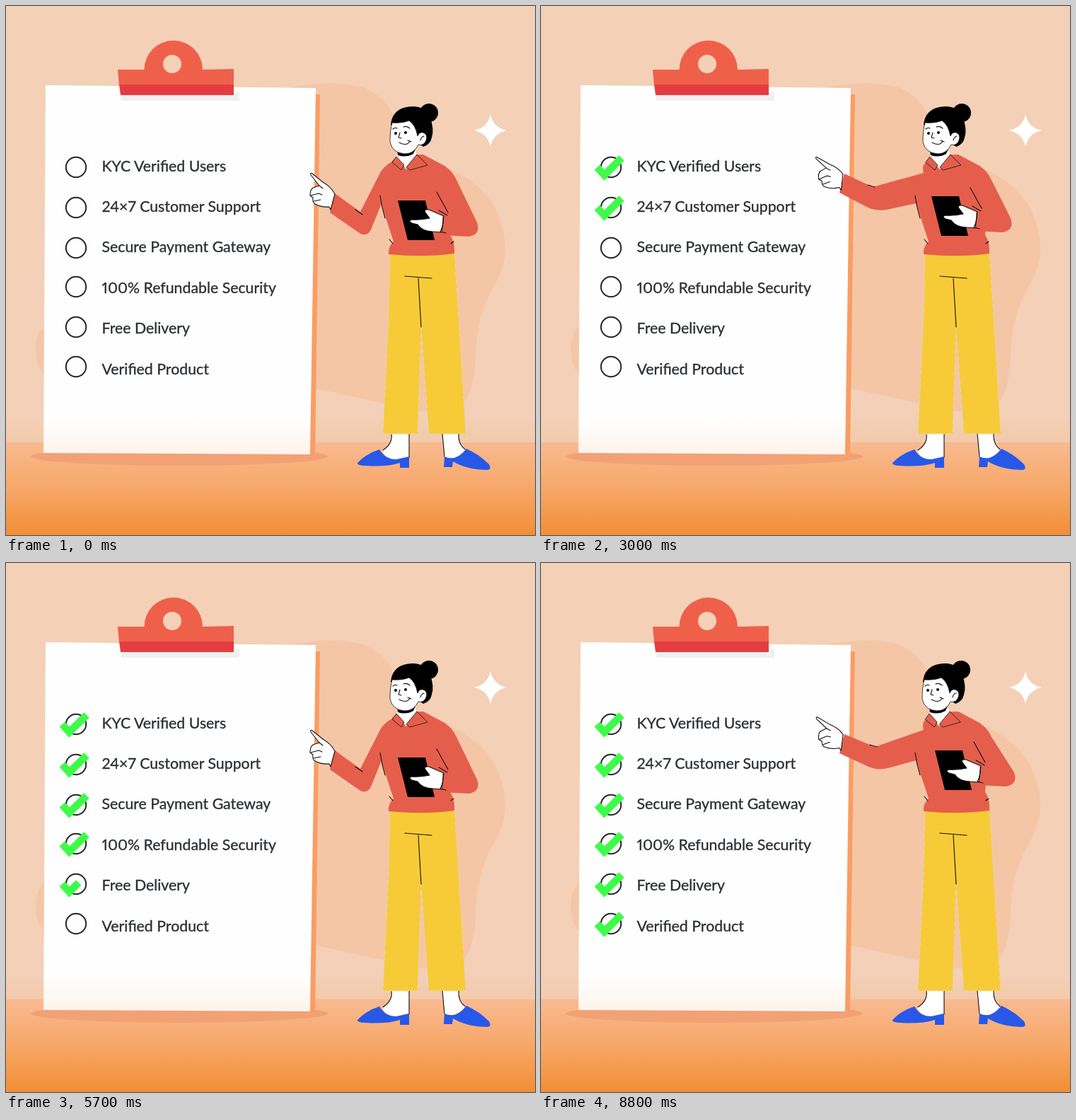
An HTML page that plays this animation: 748x748 px, repeating every 8900 ms.

```html
<!DOCTYPE html>
<html lang="en">
<head>
<meta charset="utf-8">
<title>Checklist</title>
<style>
  html, body { margin: 0; width: 100%; height: 100%; overflow: hidden; background: #f4d0b7; }
  svg { display: block; width: 100vw; height: 100vh; }
  text {
    font: 21.3px Lato, sans-serif; font-variant-numeric: proportional-nums;
    fill: #2b3033; stroke: #2b3033; stroke-width: .35;
  }
  .ring { fill: none; stroke: #25292d; stroke-width: 2; }
  .check { fill: none; stroke: #3ffb49; stroke-width: 10.6; }
  .line { fill: none; stroke: #111; stroke-width: 1.1; stroke-linecap: round; stroke-linejoin: round; }
  .skin { fill: #fff; stroke: #111; stroke-width: 1.1; stroke-linejoin: round; }
  .red { fill: #e55e4c; }
  .blue { fill: #2858e8; }
</style>
</head>
<body>
<svg viewBox="0 0 748 748">
  <defs>
    <linearGradient id="wall" x2="0" y2="1">
      <stop offset="0" stop-color="#f4d0b6"/>
      <stop offset=".94" stop-color="#f3d0b7"/>
      <stop offset="1" stop-color="#f3c9aa"/>
    </linearGradient>
    <linearGradient id="floor" x2="0" y2="1">
      <stop offset="0" stop-color="#f9ba91"/>
      <stop offset=".5" stop-color="#f7a768"/>
      <stop offset="1" stop-color="#f38e35"/>
    </linearGradient>
    <linearGradient id="paper" x2="0" y2="1">
      <stop offset=".9" stop-color="#fffeff"/>
      <stop offset="1" stop-color="#fdf4eb"/>
    </linearGradient>
  </defs>

  <rect width="748" height="618" fill="url(#wall)"/>
  <rect y="617" width="748" height="131" fill="url(#floor)"/>
  <path fill="#f5c6a6" d="M380 120Q455 102 505 115Q548 132 554 180Q575 222 625 230Q702 262 706 340Q707 368 690 396Q664 440 664 500Q661 558 635 571Q600 580 540 563L440 541L60 525Q42 515 42 482Q43 458 60 448Z"/>
  <path fill="#fff" d="M685 153Q689 172 708 176Q689 180 685 199Q681 180 662 176Q681 172 685 153Z"/>

  <ellipse cx="245" cy="637" rx="210" ry="13" fill="#f2a175"/>
  <path fill="#fa9d63" d="M430 125H444L437 635H425Z"/>
  <path fill="url(#paper)" d="M56 112L438 116L430 634L53 632Z"/>
  <path fill="#f1f0f1" d="M162 125L330 122V134H163Z"/>
  <path fill="#ef604a" fill-rule="evenodd" d="M158 90H195.500A41.250 41.250 0 0 1 278 90L322 89V113H160ZM222 82a13 13 0 1 0 26 0a13 13 0 1 0 -26 0Z"/>
  <path fill="#e43d41" d="M160 111H322V126H162Z"/>
  <g id="list"></g>

  <!-- legs -->
  <path fill="#fff" d="M545 603H570V642H540L532 629Q545 620 545 610Z"/>
  <path fill="#fff" d="M617 603H640V613L650 628L636 643L620 638Z"/>
  <path class="line" d="M545 605Q547 619 533 628M570 605V638M617 605L620 637M640 605Q639 619 649 627"/>
  <path class="blue" d="M497 646Q509 633 528 627Q536 641 552 641L570 637V653H557V646Q538 652 508 650Q496 650 497 646Z"/>
  <path class="blue" d="M620 637Q636 645 651 626Q669 634 683 648Q687 655 681 656Q652 656 632 644L631 652H619Z"/>
  <path fill="#f7cb38" stroke="#e6d6ad" stroke-width="1" stroke-dasharray="7 4" d="M543 346H634L640 440L650 605H598L587 455L582 605H533L541 440Z"/>
  <path class="line" d="M564 382L602 385M583 385L587 454"/>

  <!-- torso -->
  <path class="red" d="M546 219L556 211L590 210L622 227L634 250L628 324Q635 333 634 350Q590 356 541 351Q540 341 548 333L529 275L541 240Z"/>
  <path class="red" id="arm"/>
  <path class="line" id="crease"/>
  <path class="line" d="M529 268Q531 284 536 300M542 330L547 336M633 333L629 336"/>
  <g id="hand">
    <path class="skin" d="M465 266Q460 256 448 249L433 237Q430 235 431 239L443 254L434 257Q430 260 430 268L434 271Q433 278 437 280Q446 285 457 284L459 288Z"/>
    <path class="line" d="M443 254L448 258M431 268L442 265L447 267M435 276L445 274"/>
  </g>

  <path class="red" id="sleeve"/>
  <g id="tablet">
    <path d="M554 275H593L606 331H568Z"/>
    <path class="skin" d="M619 297L598 288Q590 287 593 292L599 300Q585 303 574 302Q568 304 574 307L582 309Q588 318 603 319L616 320Z"/>
    <path class="line" d="M609 263L625 292M612 289L624 296M618 298Q619 310 614 319L622 321"/>
  </g>

  <g id="collar">
    <path fill="#fff" d="M554 205H579L580 212L566 231L552 214Z"/>
    <path class="red" stroke="#111" stroke-width=".8" d="M552 213L546 221L559 232L563 225ZM581 210L596 225L571 232L566 228Z"/>
  </g>
  <g id="head">
    <circle cx="598" cy="151" r="13"/>
    <path d="M544 168Q546 147 566 143Q590 138 599 156Q606 174 602 186Q600 196 590 199L570 186Z"/>
    <path d="M553 204L580 200L576 209Q566 215 554 211Z"/>
    <path fill="#fff" stroke="#111" stroke-width=".8" d="M546 165Q560 166 570 162Q579 168 582 184Q584 178 590 179Q597 182 594 190Q591 198 583 196Q577 209 564 209Q546 208 543 192Q543 176 546 165Z"/>
    <circle cx="551" cy="180" r="2"/>
    <circle cx="565" cy="179" r="2"/>
    <path class="line" d="M547 174Q550 171 553 173M562 171Q567 169 571 173M557 179L555 186L559 187M556 193Q567 199 571 191M568 190L573 192M586 190Q587 185 591 184"/>
  </g>
</svg>
<script>
const LOOP = 8900, SWAY = 6000, STEP = 100, DRAW = 500;
const $ = id => document.getElementById(id);

// label, ring centre, text baseline, time its tick starts
const items = [
  ['KYC Verified Users', 228, 234, 600],
  ['24×7 Customer Support', 285, 291, 1800],
  ['Secure Payment Gateway', 342, 348, 3100],
  ['100% Refundable Security', 397, 405.5, 4390],
  ['Free Delivery', 454, 462.5, 5360],
  ['Verified Product', 510, 521, 6400]
];
$('list').innerHTML = items.map(([label, ring, base]) => `
  <circle class="ring" cx="99" cy="${ring}" r="14.2"/>
  <text x="135.500" y="${base}">${label}</text>
  <path class="check" pathLength="1" d="M79.500 ${ring}L89.500 ${ring + 11}L114 ${ring - 13}"/>`).join('');
const checks = document.querySelectorAll('.check');

// time, head shift, tablet shift x y, inner elbow x y, outer elbow x y, cuff top x y, hand turn
const poses = [
  [0, 0, 0, 0, 501, 291, 503, 324, 465, 265, 0],
  [1000, -2.500, 3, -4, 490, 285, 492, 317, 450, 258, -2],
  [1900, -5.500, 7, -11, 474, 265, 476, 296, 431, 246, -7],
  [2800, -4, 3, -10, 472, 260, 474, 291, 429, 242, -8],
  [3000, -3, -2, -6, 469, 256, 472, 288, 429, 237, -9],
  [4600, 0, -11, 4, 478, 262, 476, 292, 440, 230, -9],
  [5700, 0, 0, 0, 501, 291, 503, 324, 465, 265, 0],
  [6000, 0, 0, 0, 501, 291, 503, 324, 465, 265, 0]
];
const mix = (a, b, k) => a + (b - a) * k;
const between = (p, q, k) => p.map((v, i) => mix(v, q[i], k));

function poseAt(t) {
  const next = poses.findIndex(p => p[0] > t);
  const a = poses[next - 1], b = poses[next];
  return between(a, b, (t - a[0]) / (b[0] - a[0]));
}

function drawPerson(t) {
  const [, head, tx, ty, ix, iy, bx, by, cx, cy, turn] = poseAt(t);
  const lift = Math.min(1, (501 - ix) / 27);
  const cuff = [cx - 7, cy + 27], pit = [531, 279];
  const elbow = [bx + mix(8, 2, lift), by + mix(5, 3, lift)];

  $('arm').setAttribute('d', `M548 219Q537 224 ${mix(530, 541, lift)} ${mix(234, 236, lift)}
    L${ix} ${iy}L${cx} ${cy}L${cuff}L${between(elbow, cuff, .25)}
    Q${elbow} ${between(elbow, pit, .3)}L${pit}L560 260Z`);
  $('crease').setAttribute('d', `M${ix - 7} ${iy - 3}L${ix + 3} ${iy + mix(4, 0, lift)}`);
  $('hand').setAttribute('transform',
    `translate(${cx - 465} ${cy - 265}) rotate(${turn} 461 279)`);

  const at = (x, y) => `${x + tx} ${y + ty}`;
  $('sleeve').setAttribute('d', `M600 216L620 227Q630 231 637 246L${at(666, 306)}
    Q${at(672, 323)} ${at(654, 326)}L${at(614, 324)}L${at(619, 296)}L${at(626, 296)}L608 262Z`);
  $('tablet').setAttribute('transform', `translate(${tx} ${ty})`);
  $('head').setAttribute('transform', `translate(${head} 0)`);
  $('collar').setAttribute('transform', `translate(${head * .7} 0)`);
}

function draw(t) {
  checks.forEach((check, i) => {
    const k = Math.max(0, Math.min(1, (t - items[i][3]) / DRAW));
    check.style.visibility = k ? 'visible' : 'hidden';
    check.style.strokeDasharray = `${k} 2`;
  });
  drawPerson(t % SWAY);
}

const start = performance.now();
function tick() {
  const t = (performance.now() - start) % LOOP;
  draw(Math.floor(t / STEP) * STEP);
  requestAnimationFrame(tick);
}
tick();
</script>
</body>
</html>
```
